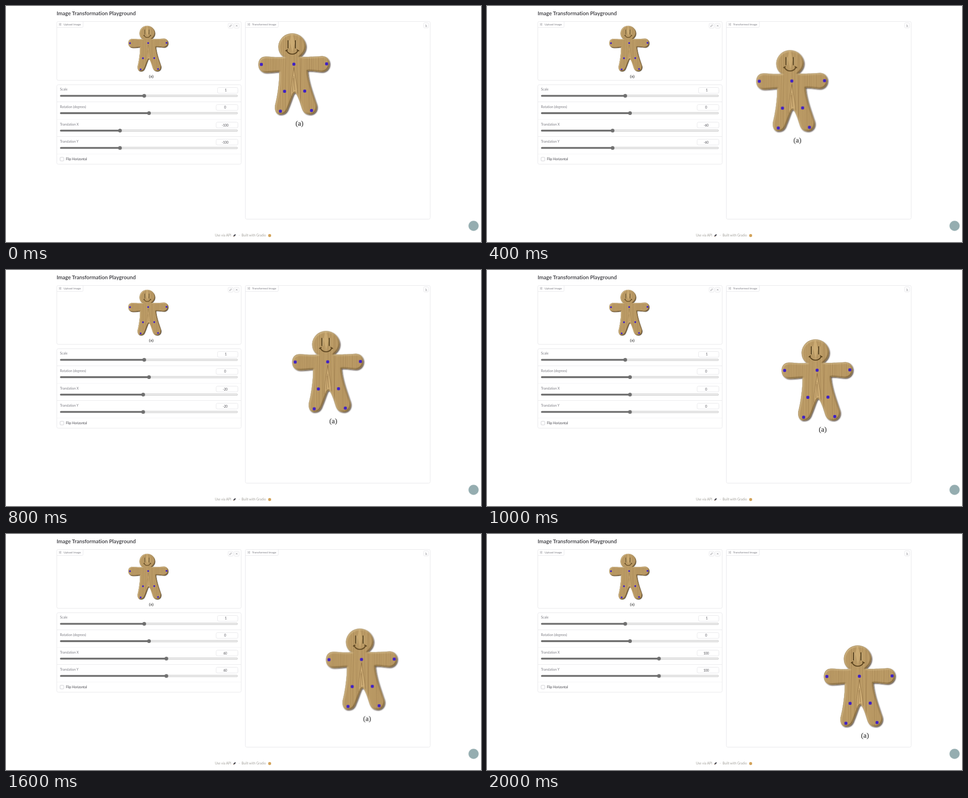
Write an HTML page that moves like this. It is 1023x511 px and loops after 2200 ms.

```html
<!DOCTYPE html>
<html lang="en">
<head>
<meta charset="utf-8">
<title>Image Transformation Playground</title>
<style>
  @property --v { syntax: "<integer>"; inherits: false; initial-value: -100; }
  html, body { margin: 0; width: 100%; height: 100%; overflow: hidden; background: #fff; }
  svg { position: absolute; left: 0; top: 0; width: 1023px; height: 511px; }
  text, .num { font-family: Lato, "Open Sans", sans-serif; font-variant-ligatures: none; }
  .title { font-size: 11.5px; font-weight: 600; fill: #333338; }
  .tag { font-size: 6.2px; fill: #7c7c84; }
  .label { font-size: 7.1px; fill: #7a7a81; }
  .dark { fill: #46464d; }
  .foot { font-size: 7.1px; fill: #a3a19b; }
  .value { font-size: 6.6px; fill: #46464d; text-anchor: middle; }
  .caption { font: 15.5px "Liberation Serif", serif; fill: #3a3a3a; stroke: #3a3a3a; stroke-width: .25; text-anchor: middle; }
  .box { fill: #fff; stroke: #e7e7ea; }
  .rule { fill: none; stroke: #e9e9ec; }
  .faint { stroke: #f5f5f6; }
  .icon { fill: none; stroke: #8e8e95; stroke-width: .8; }
  .track { fill: #efefef; stroke: #bdbdbd; stroke-width: .8; }
  .knob { fill: #707070; }

  /* eleven equal steps of 20 units per loop */
  .man, .slide, .num { animation: 2.2s steps(11) infinite; }
  .man { animation-name: shift; }
  .slide { animation-name: slide; }
  .num { animation-name: count; counter-reset: v var(--v); }
  .num::before { content: counter(v); }
  @keyframes shift { to { transform: translate(200.2px, 200.2px); } }
  @keyframes slide { to { transform: translateX(137.3px); } }
  @keyframes count { from { --v: -100; } to { --v: 120; } }

  .num {
    position: absolute; left: 452px; width: 40px;
    font-size: 6.6px; line-height: 12px; text-align: center; color: #46464d;
  }
</style>
</head>
<body>
<svg viewBox="0 0 1023 511">
  <defs>
    <path id="body" d="M598 110C589 104 586.5 96 586.5 87A29.8 29.5 0 0 1 646 87C646 97 641 104 634 109.5
      C650 111 668 109 681 108.5C691 108.5 697 117 697 125C697 136 689 143 680 143C670 143 660 140 650 141
      C651 164 663 194 669 213C672.5 226 664 235 655 235C645 235 640 230 637 221C633 208 630 198 625 190
      Q622 186 619.5 191C616 199 612 212 608 221C605 230 600 235 591 235C582 235 578 227 579.5 215
      C584.5 195 589 165 588.5 142.5C580 143 570 144.5 561 144.5C550 144.5 543.5 137 543.5 127
      C543.5 115 550 109 561 109.5C573 110 586 112 598 110Z"/>
    <clipPath id="cut"><use href="#body"/></clipPath>
    <clipPath id="trackClip"><rect x="116.5" y="-2" width="300" height="4" rx="1.5"/></clipPath>
    <filter id="shadow" x="-10%" y="-10%" width="120%" height="120%">
      <feDropShadow dx="1.6" dy="1.6" stdDeviation="1.1" flood-color="#2e2218" flood-opacity=".8"/>
    </filter>
    <filter id="soft" x="-10%" y="-10%" width="120%" height="120%"><feGaussianBlur stdDeviation="1.3"/></filter>

    <g id="man">
      <use href="#body" fill="#bf9f69" filter="url(#shadow)"/>
      <g clip-path="url(#cut)">
        <g id="grain" fill="none" stroke="#8a6a3e"></g>
        <path d="M620 133C622 150 627 166 628 190L613 196C613 170 618 152 620 133Z" fill="#d6b67c" opacity=".7"/>
        <path d="M616 57L622 80L617 100L611 78Z" fill="#d6b67c" opacity=".6"/>
        <path d="M620 133C622 150 627 166 628 190M620 133C618 152 613 170 613 196M620 152L622 182M619 156L617 186"
          fill="none" stroke="#8a6a3e" stroke-width=".8"/>
        <g fill="none" filter="url(#soft)">
          <use href="#body" x="-.8" y="-.8" stroke="#4a3414" stroke-width="3" opacity=".7"/>
          <use href="#body" x="1.2" y="1.2" stroke="#e2cb9c" stroke-width="3" opacity=".65"/>
        </g>
      </g>
      <g fill="none" stroke-linecap="round">
        <path d="M609.5 75V91M625.5 75V91" stroke="#d9bd88" stroke-width="1.5"/>
        <path d="M607.5 75V91M623.5 75V91" stroke="#53401f" stroke-width="2.2"/>
        <path d="M604 96C609 107 624 107 629 96M602.5 97L606 95M627 95L630.5 97" stroke="#5a431f" stroke-width="2.1"/>
      </g>
      <g id="dots" fill="#4122c4"></g>
      <text class="caption" x="632" y="259">(a)</text>
    </g>
    <g id="pic" class="icon"><path d="M0 .5H1.4M2.4 .5H5M0 2.5H5M0 4.5H1.4M2.4 4.5H5"/></g>
  </defs>

  <text class="title" x="109" y="20.2">Image Transformation Playground</text>

  <rect class="box" x="109.5" y="33.5" width="397" height="127.5" rx="3"/>
  <path class="rule" d="M110 46.5H163.5Q166 46.5 166 44V34"/>
  <use href="#pic" x="114" y="37.3"/>
  <text class="tag" x="124" y="42.2">Upload Image</text>
  <rect class="box" x="478.5" y="37.5" width="10.5" height="10.5" rx="2"/>
  <path class="icon" d="M481.5 45L482 43.3L485 40.3L486.2 41.5L483.2 44.5Z"/>
  <rect class="box" x="491.5" y="37.5" width="10.5" height="10.5" rx="2"/>
  <path class="icon" d="M494.8 40.8L498.7 44.7M498.7 40.8L494.8 44.7"/>
  <use href="#man" transform="translate(-41 9.7) scale(.56)"/>

  <rect class="box" x="515.5" y="33.5" width="398" height="428" rx="3"/>
  <path class="rule" d="M516 46.5H584Q586.5 46.5 586.5 44V34"/>
  <use href="#pic" x="520.5" y="37.3"/>
  <text class="tag" x="530" y="42.2">Transformed Image</text>
  <rect class="box" x="899.5" y="36.5" width="10.5" height="11" rx="2"/>
  <path class="icon" d="M903.3 39.8L905.8 42.6M903.3 42.6H906M903 44.6H907"/>
  <g class="man"><use href="#man"/></g>

  <rect class="box" x="109.5" y="170.5" width="397" height="172" rx="3"/>
  <path class="rule" d="M110 207.5H506M110 282.5H506"/>
  <path class="rule faint" d="M110 245.5H506M110 320.5H506"/>
  <g id="sliders"></g>
  <text class="value" x="473.5" y="184.9">1</text>
  <text class="value" x="472" y="222.3">0</text>
  <rect class="box" x="116.5" y="327.5" width="8" height="8" rx="1.5" style="stroke:#d0d0d4"/>
  <text class="label dark" x="129" y="333.8">Flip Horizontal</text>

  <text class="foot" x="450" y="499.3">Use via API</text>
  <path d="M489.3 498.3L491.2 495.3L495 493.8L494 497.4L491 499.2Z" fill="#55555c"/>
  <path d="M489 500L490.3 498.3L491 499.2Z" fill="#d08a4a"/>
  <text class="foot" x="501.3" y="499.3">·</text>
  <text class="foot" x="507.3" y="499.3">Built with Gradio</text>
  <circle cx="567.8" cy="497" r="3.2" fill="#d3a45c"/>
  <circle cx="1007" cy="476" r="11.6" fill="#e6ecec"/>
  <circle cx="1007" cy="476" r="10.7" fill="#95adb0"/>
</svg>
<div class="num" style="top:251.5px"></div>
<div class="num" style="top:289px"></div>

<script>
  const $ = id => document.getElementById(id);

  // wood grain: wavering vertical lines
  let seed = 7;
  const rand = () => (seed = seed * 16807 % 2147483647) / 2147483647;
  let lines = "";
  for (let x = 542; x < 702; x += 1.8 + rand() * 1.6) {
    const bend = (rand() * 3 - 1.5).toFixed(1);
    lines += `<path d="M${x.toFixed(1)} 55q${bend} 46 0 92t0 92"
      stroke-width="${(0.5 + rand() * 0.7).toFixed(2)}" opacity="${(0.25 + rand() * 0.35).toFixed(2)}"/>`;
  }
  $("grain").innerHTML = lines;

  const dots = [[550, 126.5], [620, 126], [690.5, 125.3], [600, 184.7], [643.3, 184.2], [591, 227.8], [658, 226.3]];
  $("dots").innerHTML = dots.map(([x, y]) =>
    `<rect x="${x - 3.2}" y="${y - 3.2}" width="6.4" height="6.4" rx="2"/>`).join("");

  // label, track height, knob position, field left edge, moving
  const sliders = [
    ["Scale", 194.5, 297.7, 455.5, false],
    ["Rotation (degrees)", 232, 308, 452.5, false],
    ["Translation X", 269.8, 245.5, 452.5, true],
    ["Translation Y", 307.4, 245.5, 452.5, true]
  ];
  $("sliders").innerHTML = sliders.map(([name, y, x, left, moves]) => `
    <text class="label" x="116.3" y="${y - 11.2}">${name}</text>
    <rect class="box" x="${left}" y="${Math.round(y - 19) + 0.5}" width="${499.5 - left}" height="12.5" rx="3"/>
    <g transform="translate(0 ${y})">
      <rect class="track" x="116.9" y="-1.7" width="381.7" height="3.4" rx="1.5"/>
      <g clip-path="url(#trackClip)">
        <rect class="knob${moves ? " slide" : ""}" x="${x - 300}" y="-2" width="300" height="4"/>
      </g>
      <circle class="knob${moves ? " slide" : ""}" cx="${x}" cy="0" r="4"/>
    </g>`).join("");
</script>
</body>
</html>
```
